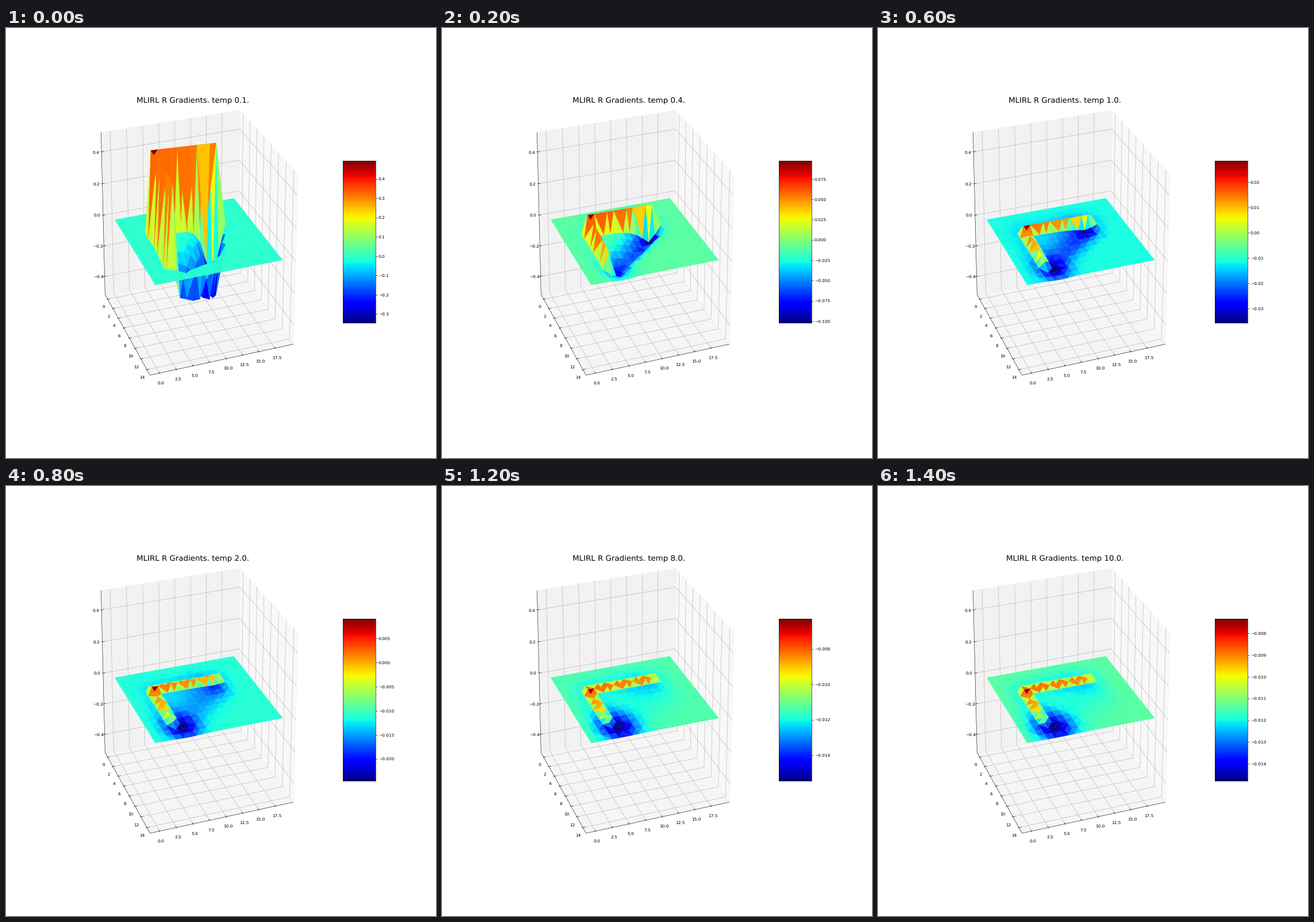
These frames come from a looping animation (748 px wide and 748 px high, 1.6 s). A matplotlib script:

```python
import numpy as np
import matplotlib.pyplot as plt
from matplotlib.animation import FuncAnimation
from matplotlib.collections import LineCollection, PolyCollection

plt.rcParams.update({"font.family": "DejaVu Sans", "text.hinting": "no_hinting"})

TEMPS = (0.1, 0.4, 0.8, 1, 2, 4, 8, 10)
ROWS, COLS = 15, 20
FLAT = -0.0114
EDGE = 0.5 + 1 / 48          # panes sit slightly outside the unit box
LABEL = EDGE + 0.0332
ELEV, AZIM, DIST = np.radians(25), np.radians(-20), 10

# Height and depth of the surface, times temp, at a few temps
KEY_TEMPS = np.log((0.1, 0.4, 1, 4, 10))
KEY_RISE = (0.0506, 0.0436, 0.0399, 0.0420, 0.0406)
KEY_DROP = (0.0336, 0.0364, 0.0243, 0.0285, 0.0339)

gi, gj = (a.ravel().astype(float) for a in np.mgrid[:ROWS, :COLS])
on_row = (gi == 4) & (gj >= 4) & (gj <= 14)
on_arm = (gj == 4) & (gi >= 4) & (gi <= 11)
ridge = on_row | on_arm


def mesh_triangles():
    """Split every grid cell in two, turning the diagonal in every third cell."""
    faces = []
    for i in range(ROWS - 1):
        for j in range(COLS - 1):
            a = i * COLS + j
            b, c, d = a + 1, a + COLS, a + COLS + 1
            if (2 * i + j) % 3 == 1:
                faces += [(a, b, d), (a, d, c)]
            else:
                faces += [(a, b, c), (b, d, c)]
    return np.array(faces)


triangles = mesh_triangles()


def bell(distance, width):
    return np.exp(-(distance / width) ** 2 / 2)


def expected_visits(temp):
    """A diagonal path that widens with temp and gathers around its goal."""
    s = (np.log10(temp) + 1) / 2
    ai, aj = 5.7, -8.2
    di, dj = gi - 5.6, gj - 13.2
    length = np.hypot(ai, aj)
    t = (di * ai + dj * aj) / length ** 2
    tc = np.clip(t, 0, 1)
    bow = 1.7 * (1 - s) ** 4 * 4 * tc * (1 - tc)
    side = (dj * ai - di * aj) / length - bow
    width = np.where(side < 0, 1.5 + 1.5 * s ** 2, 0.4 + 2.4 * s ** 2)
    path = (1 - 0.45 * tc) * bell(side, width)
    path *= bell((t - tc) * length, 0.3 + 0.3 * width)

    spread = 1 + 0.9 * s
    goal = np.sin(np.pi * s / 2) * bell(
        np.hypot(gi - 11 - 0.6 * spread, gj - 4.8), spread)
    start = 3 * s * (1 - s) ** 2 * bell(np.hypot(gi - 5.4, gj - 13.2), 0.9)
    to_ridge = np.minimum(np.hypot(gi - 4, gj - np.clip(gj, 4, 14)),
                          np.hypot(gi - np.clip(gi, 4, 11), gj - 4))
    halo = 0.2 * s * bell(to_ridge, 1.5)
    total = np.clip(1.3 - 1.4 * s, 0.2, 1) * path + goal + start + halo
    return np.where(ridge, 0, total), goal


def surface(temp):
    rise = np.interp(np.log(temp), KEY_TEMPS, KEY_RISE) / temp
    drop = np.interp(np.log(temp), KEY_TEMPS, KEY_DROP) / temp
    visits, goal = expected_visits(temp)
    scale = drop / visits[triangles].mean(axis=1).max()
    slope = (0.0002 * (gj - 4) * on_row / temp
             + 0.002 * (gi - 4) * on_arm / (temp + 0.6))
    crest = FLAT + rise + 0.0003 / temp - slope - scale * goal * (gi > 8)
    z = np.where(ridge, crest, FLAT - scale * visits)
    return z, FLAT - drop, FLAT + rise


def project(x, y, z):
    """Box coordinates centred on zero to pixels from bottom left, and depth."""
    ce, se, ca, sa = np.cos(ELEV), np.sin(ELEV), np.cos(AZIM), np.sin(AZIM)
    across = -sa * x + ca * y
    up = -se * ca * x - se * sa * y + ce * z
    depth = DIST - (ce * ca * x + ce * sa * y + se * z)
    px = 748 * (0.125 + 0.62 * (across / depth + 0.095) / 0.185)
    py = 748 * (0.125 + 0.755 * (up / depth + 0.095) / 0.185)
    return px, py, depth


def flat_points(*points):
    return [project(*p)[:2] for p in points]


def box(value, top):
    return (value / top - 0.5) / 1.1


fig = plt.figure(figsize=(14, 14), dpi=53.4286, facecolor="white")
ax = fig.add_axes([0, 0, 1, 1])
ax.set(xlim=(0, 748), ylim=(0, 748))
ax.axis("off")


def add_lines(segments, color, width):
    ax.add_collection(LineCollection(segments, colors=color, linewidths=width))


def add_pane(gray, *corners):
    ax.add_collection(PolyCollection([flat_points(*corners)], facecolors=str(gray),
                                     edgecolors=str(gray), linewidths=1, alpha=0.5))


def add_label(text, point):
    px, py, _ = project(*point)
    ax.text(px, py, text.replace("-", "\u2212"), fontsize=10, ha="center", va="top")


L, H = -EDGE, EDGE
add_pane(0.90, (L, L, L), (L, H, L), (L, H, H), (L, L, H))
add_pane(0.95, (L, H, L), (H, H, L), (H, H, H), (L, H, H))
add_pane(0.925, (L, L, L), (H, L, L), (H, H, L), (L, H, L))

grid, ticks = [], []
OUT, IN = EDGE + 0.1 / 12, EDGE - 0.2 / 12
for value in range(0, 15, 2):
    x = box(value, 14)
    grid.append(flat_points((x, L, L), (x, H, L), (x, H, H)))
    ticks.append(flat_points((x, -OUT, L), (x, -IN, L)))
    add_label(str(value), (x, -LABEL, -LABEL))
for value in np.arange(0, 18, 2.5):
    y = box(value, 19)
    grid.append(flat_points((H, y, L), (L, y, L), (L, y, H)))
    ticks.append(flat_points((OUT, y, L), (IN, y, L)))
    add_label(f"{value:.1f}", (LABEL, y, -LABEL))
for value in (-0.4, -0.2, 0.0, 0.2, 0.4):
    grid.append(flat_points((L, L, value), (L, H, value), (H, H, value)))
    ticks.append(flat_points((L, -OUT, value), (L, -IN, value)))
    add_label(f"{value:.1f}", (-LABEL, -LABEL, value))
add_lines(grid, "#b0b0b0", 0.8)
add_lines([flat_points((L, L, H), (L, L, L), (H, L, L), (H, H, L))], "black", 0.75)
add_lines(ticks, "black", 0.8)

faces = PolyCollection([], cmap="jet", edgecolors="face", linewidths=0.3, zorder=4)
ax.add_collection(faces)
title = fig.text(0.435, 1 - 130.5 / 748, "", fontsize=18, ha="center", va="baseline")

bar = fig.add_axes([0.78375, 0.31375, 0.0755, 0.3775])
ramp = bar.imshow(np.linspace(0, 1, 256)[:, None], cmap="jet", origin="lower",
                  aspect="auto")
bar.set_xticks([])
bar.yaxis.tick_right()


def update(frame):
    temp = TEMPS[frame]
    z, low, high = surface(temp)
    px, py, depth = project(box(gi, 14), box(gj, 19), z)
    order = np.argsort(-depth[triangles].mean(axis=1))
    shown = triangles[order]
    faces.set_verts(np.stack([px, py], axis=1)[shown])
    faces.set_array(z[shown].mean(axis=1))
    faces.set_clim(low, high)
    ramp.set_extent((0, 1, low, high))
    bar.set_ylim(low, high)
    title.set_text(f"MLIRL R Gradients. temp {temp:.1f}.")
    return faces, ramp, title


anim = FuncAnimation(fig, update, frames=len(TEMPS), interval=200, repeat=True)
plt.show()
```
